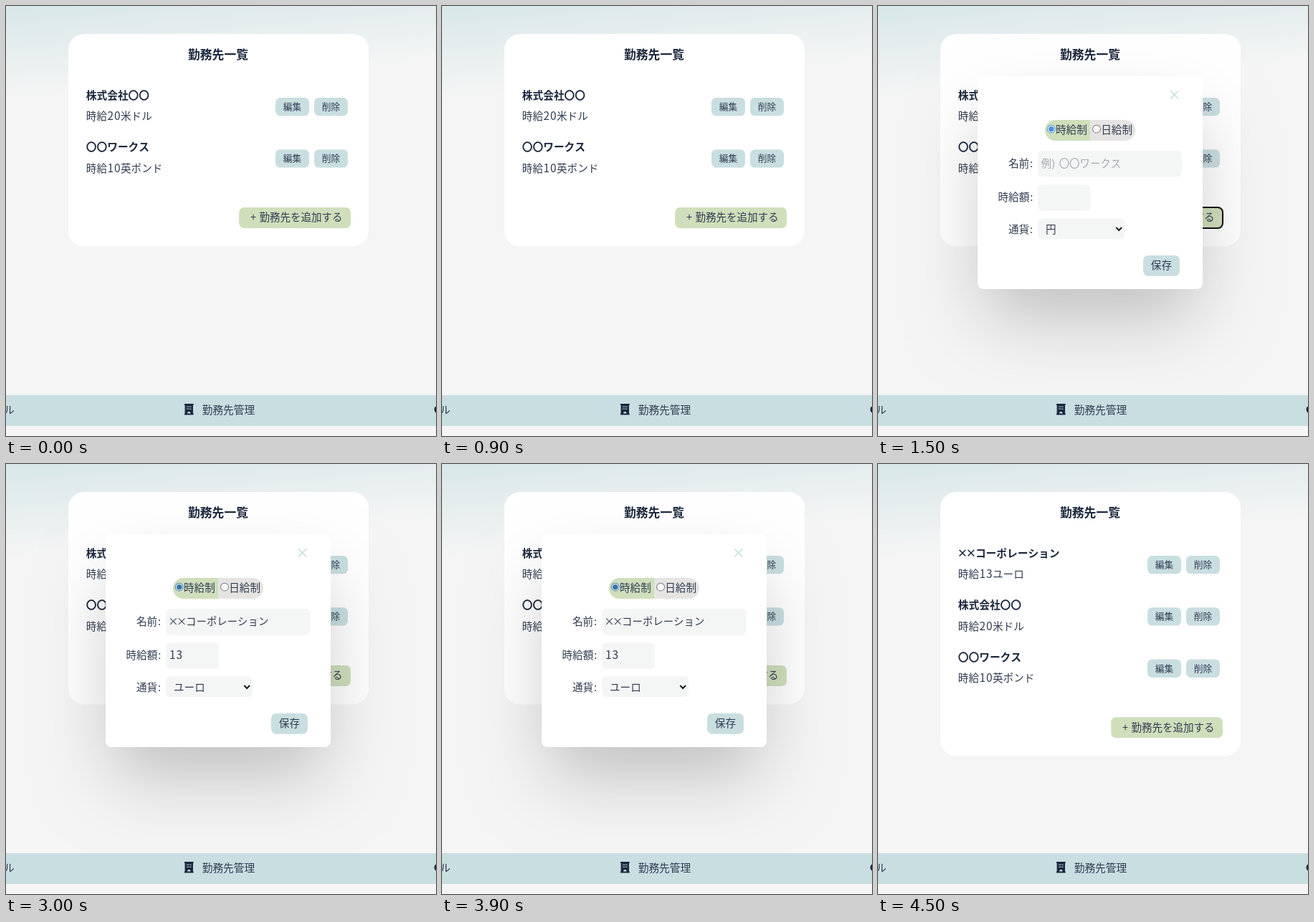
Animation of 600 by 600 pixels, one loop 6000 ms. Source, as an HTML page with a canvas:

```html
<!DOCTYPE html>
<html lang="ja">
<head>
<meta charset="utf-8">
<title>勤務先一覧</title>
<style>
html, body { margin: 0; width: 100%; height: 100%; overflow: hidden; background: #f5f5f5; }
canvas { display: block; width: 600px; height: 600px; }
</style>
</head>
<body>
<canvas id="stage"></canvas>
<script>
const canvas = document.getElementById('stage');
const ctx = canvas.getContext('2d');
const dpr = window.devicePixelRatio || 1;
canvas.width = canvas.height = 600 * dpr;

const FONT = '"Noto Sans CJK JP", "Noto Sans CJK", "Noto Sans", sans-serif';
const INK = '#1b273d', SOFT_INK = '#303b50';
const TEAL = '#c9dee1', GREEN = '#cfdfbc', FIELD = '#f4f5f5';
const SIZE = 14.6, STEP = 72.3;
const ADVANCE = { '×': 0.82, '+': 0.64, ':': 0.4, ')': 0.4, ' ': 0.35 };

const JOBS = [
  ['株式会社〇〇', '時給20米ドル'],
  ['〇〇ワークス', '時給10英ポンド']
];
const NEW_JOB = ['××コーポレーション', '時給13ユーロ'];

function box(x, y, x2, y2, r, fill) {
  ctx.beginPath();
  ctx.roundRect(x, y, x2 - x, y2 - y, r);
  ctx.fillStyle = fill;
  ctx.fill();
}

function line(points, color, width) {
  ctx.beginPath();
  points.forEach(([x, y]) => ctx.lineTo(x, y));
  ctx.strokeStyle = color;
  ctx.lineWidth = width;
  ctx.stroke();
}

function disc(x, y, r, fill) {
  ctx.beginPath();
  ctx.arc(x, y, r, 0, Math.PI * 2);
  ctx.fillStyle = fill;
  ctx.fill();
}

// Sets each character in its own cell, vertically centred on cy.
function text(str, x, cy, { size = SIZE, weight = 300, color = SOFT_INK } = {}) {
  ctx.fillStyle = color;
  ctx.textAlign = 'center';
  for (const ch of str) {
    const digit = /\d/.test(ch);
    const w = size * (digit ? 0.65 : ADVANCE[ch] || 1);
    ctx.font = `${weight} ${digit ? size * 1.06 : size}px ${FONT}`;
    ctx.fillText(ch, x + w / 2, cy + size * 0.38);
    x += w;
  }
}

function backdrop() {
  ctx.fillStyle = '#f5f5f5';
  ctx.fillRect(0, 0, 600, 600);
  const g = ctx.createLinearGradient(0, 0, 12, 129);
  g.addColorStop(0, '#d8e7e8');
  g.addColorStop(1, '#f5f5f5');
  ctx.fillStyle = g;
  ctx.fillRect(0, 0, 600, 140);
}

function smallButton(label, x, y) {
  box(x, y, x + 47, y + 25.3, 6.5, TEAL);
  text(label, x + 10.8, y + 12.2, { size: 12.7 });
}

function card(jobs, focused) {
  const extra = (jobs.length - 2) * STEP;
  box(87, 39, 506, 335.3 + extra, 22, '#fff');
  text('勤務先一覧', 254, 68, { size: 16.8, weight: 700, color: INK });
  jobs.forEach(([name, pay], i) => {
    const y = i * STEP;
    text(name, 111.8, 124.4 + y, { size: 14.7, weight: 700, color: INK });
    text(pay, 111.8, 153.7 + y);
    smallButton('編集', 376, 128 + y);
    smallButton('削除', 430, 128 + y);
  });
  box(325.2, 281 + extra, 481, 310 + extra, 7, GREEN);
  if (focused) {
    ctx.beginPath();
    ctx.roundRect(325, 281, 156, 29, 7);
    ctx.strokeStyle = '#101010';
    ctx.lineWidth = 2;
    ctx.stroke();
  }
  text('+', 340.5, 294.8 + extra);
  text('勤務先を追加する', 353.5, 294.8 + extra, { size: 14.5 });
}

function footer() {
  ctx.fillStyle = TEAL;
  ctx.fillRect(0, 543, 600, 43);
  text('ル', -2.8, 563.7);
  text('勤務先管理', 273.7, 563.7, { size: 14.7 });
  disc(603, 563, 5.5, INK);
  box(248.8, 555, 261.8, 557, 0.8, INK);
  box(249.6, 556, 261, 569.5, 0, INK);
  box(248.8, 568.4, 261.8, 570.4, 0.8, INK);
  for (const x of [252.2, 254.6, 257])
    for (const y of [558.4, 561.4]) box(x, y, x + 1.4, y + 1.5, 0.3, TEAL);
  ctx.beginPath();
  ctx.arc(255.3, 568.4, 2.3, Math.PI, 0);
  ctx.fillStyle = TEAL;
  ctx.fill();
}

function shadow(dy, blur, inset, alpha) {
  const far = 2000;
  ctx.save();
  ctx.shadowColor = `rgba(0,0,0,${alpha})`;
  ctx.shadowBlur = blur * dpr;
  ctx.shadowOffsetX = far * dpr;
  ctx.shadowOffsetY = dy * dpr;
  box(139 + inset - far, 98 + inset, 453 - inset - far, 395 - inset, 8, '#000');
  ctx.restore();
}

function radio(x, color) {
  const y = 171.7;
  disc(x, y, 5.9, color || '#767676');
  disc(x, y, 4.9, '#fff');
  if (color) disc(x, y, 3.8, color);
}

function modal({ name, amount, currency, accent, placeholder }) {
  shadow(50, 100, 10, 0.22);
  box(139, 98, 453, 395, 8, '#fff');
  line([[408, 118.3], [419.2, 129.5]], '#c5dfdb', 1.5);
  line([[419.2, 118.3], [408, 129.5]], '#c5dfdb', 1.5);

  box(233, 159, 296, 188, [14.5, 0, 0, 14.5], GREEN);
  box(296, 159, 359, 188, [0, 14.5, 14.5, 0], '#e6e4e3');
  radio(241.8, accent);
  radio(305, null);
  text('時給制', 248, 172.5);
  text('日給制', 311.2, 172.5);

  text('名前:', 182, 219.5);
  text('時給額:', 167.5, 266.5);
  text('通貨:', 182, 311);
  box(223.3, 202.3, 424.3, 238.5, 6, FIELD);
  box(223.3, 249.5, 296.6, 285.7, 6, FIELD);
  box(223.3, 296.3, 344, 325.3, 6, FIELD);
  text(name, 227.5, 219.5, { size: 14.4, color: placeholder ? '#a5a8ab' : SOFT_INK });
  text(amount, 227.5, 266.5);
  text(currency, 234, 311);
  line([[332.3, 309], [336.2, 313], [340.1, 309]], '#1b1b1b', 2);

  box(370, 348, 421, 376.7, 7, TEAL);
  text('保存', 380.8, 361.5);
}

const SCENES = [
  () => card(JOBS),
  () => {
    card(JOBS, true);
    modal({ name: '例) 〇〇ワークス', placeholder: true, amount: '', currency: '円', accent: '#4f8fd6' });
  },
  () => {
    card(JOBS);
    modal({ name: NEW_JOB[0], amount: '13', currency: 'ユーロ', accent: '#3874a8' });
  },
  () => card([NEW_JOB, ...JOBS])
];

const start = performance.now();

function draw() {
  const t = (performance.now() - start) % 6000;
  ctx.setTransform(dpr, 0, 0, dpr, 0, 0);
  backdrop();
  SCENES[Math.floor(t / 1500)]();
  footer();
  requestAnimationFrame(draw);
}
draw();
</script>
</body>
</html>
```
